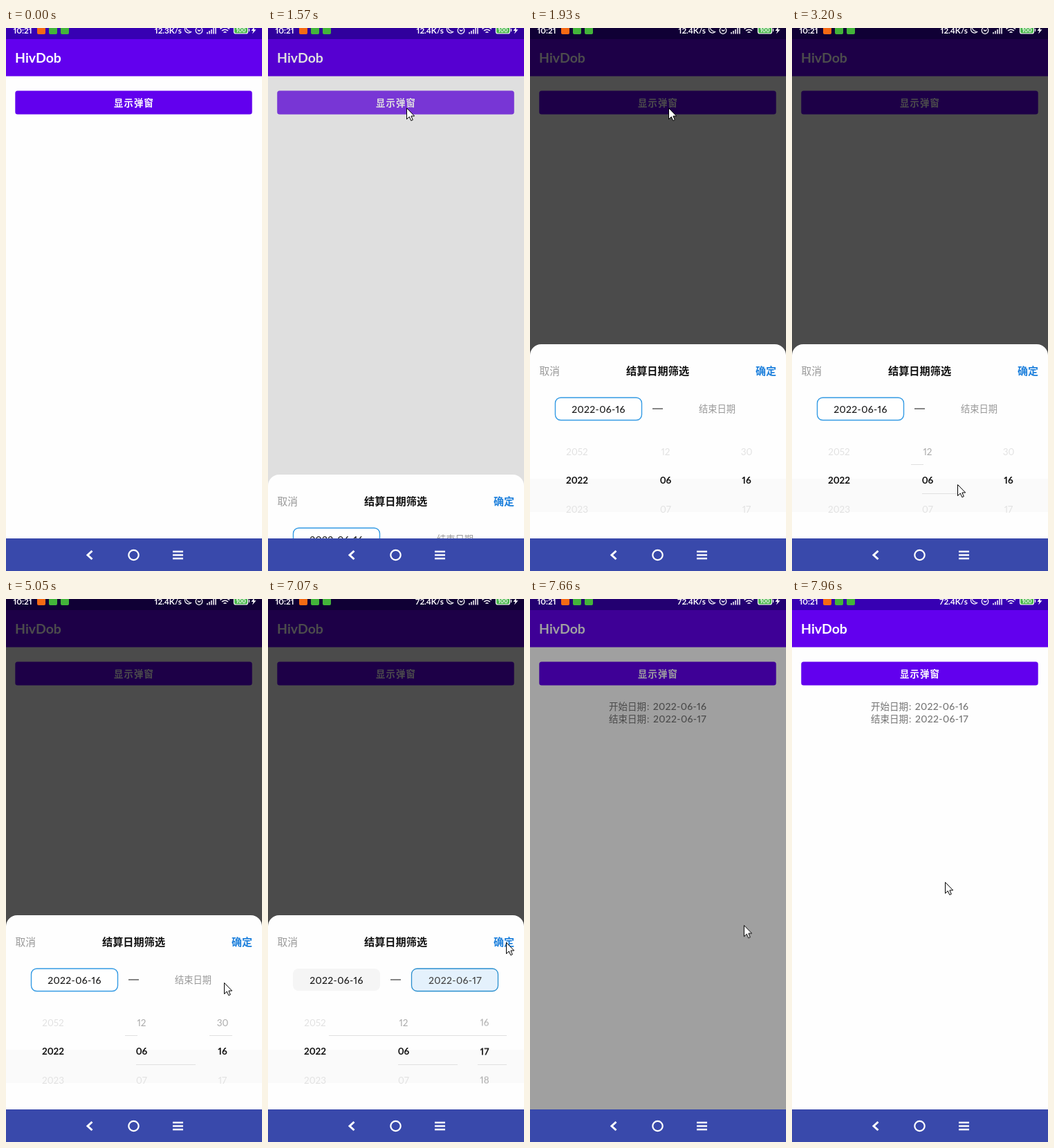
An HTML page for the animation above (8000 ms loop, 370 by 783 pixels).

```html
<!DOCTYPE html>
<html lang="zh-CN">
<head>
<meta charset="utf-8">
<title>Date picker</title>
<style>
html, body { margin: 0; width: 100%; height: 100%; overflow: hidden; background: #fefefe; }
svg { display: block; width: 370px; height: 783px; font-family: Lato, "Noto Sans CJK SC", "Noto Sans CJK", sans-serif; font-variant-numeric: proportional-nums; }
.mid { text-anchor: middle; }
.end { text-anchor: end; }
.bold { font-weight: 700; }
.date { font-size: 14px; font-weight: 500; letter-spacing: .35px; text-anchor: middle; }
.wheel { font-size: 13.5px; text-anchor: middle; fill: #aaa; }
.faint { fill: #e2e2e2; }
.picked { fill: #111; font-weight: 700; }
.rule { stroke: #e0e0e0; }
.result { font-size: 13.5px; fill: #757575; }
.status { font-size: 11.7px; font-weight: 700; fill: #fff; }

#dim, #ripple, #sheet, .spin, #cursor { animation: 8s linear infinite; }
#dim { animation-name: dim; }
#ripple { animation-name: ripple; }
#sheet { animation-name: sheet; }
.spin { animation-name: spin; }
#cursor { animation-name: cursor; }

@keyframes dim {
  0%, 18.7% { opacity: 0; }
  24.125%, 93.375% { opacity: .7; }
  98.5%, 100% { opacity: 0; }
}
@keyframes ripple {
  0%, 19.5% { opacity: 0; }
  19.625%, 21.875% { opacity: .24; }
  24.125%, 100% { opacity: 0; }
}
@keyframes sheet {
  0% { transform: translateY(282px); }
  18.875% { transform: translateY(282px); animation-timing-function: steps(3); }
  21.125% { transform: none; }
  92.625% { transform: none; animation-timing-function: steps(2); }
  94.125%, 100% { transform: translateY(282px); }
}
@keyframes spin {
  0% { transform: none; }
  73.625% { transform: none; animation-timing-function: steps(9); }
  80.375%, 100% { transform: translateY(-41.5px); }
}
@keyframes cursor {
  0% { transform: translate(343px, 273px); }
  6.875% { transform: translate(343px, 273px); animation-timing-function: steps(8); }
  12.875% { transform: translate(200px, 115px); }
  30.25% { transform: translate(200px, 115px); animation-timing-function: steps(4); }
  33.25% { transform: translate(192px, 280px); animation-timing-function: steps(4); }
  36.25% { transform: translate(174px, 608px); animation-timing-function: steps(2); }
  37.75% { transform: translate(183px, 655px); animation-timing-function: steps(3); }
  40% { transform: translate(239px, 658px); animation-timing-function: steps(1); }
  40.75% { transform: translate(247px, 658px); animation-timing-function: steps(4); }
  43.75% { transform: translate(264px, 654px); animation-timing-function: steps(5); }
  47.5% { transform: translate(296px, 630px); animation-timing-function: steps(5); }
  51.25% { transform: translate(307px, 600px); animation-timing-function: steps(3); }
  53.5% { transform: translate(308px, 606px); }
  55% { transform: translate(308px, 606px); animation-timing-function: steps(5); }
  58.75% { transform: translate(314px, 632px); animation-timing-function: steps(5); }
  62.5% { transform: translate(315px, 553px); }
  65.375% { transform: translate(315px, 553px); animation-timing-function: steps(5); }
  69.125% { transform: translate(333px, 667px); }
  70.625% { transform: translate(333px, 667px); animation-timing-function: steps(4); }
  73.625% { transform: translate(332px, 687px); animation-timing-function: steps(6); }
  78.125% { transform: translate(332px, 645px); }
  81.125% { transform: translate(332px, 645px); animation-timing-function: steps(9); }
  87.875% { transform: translate(344px, 495px); }
  94.25% { transform: translate(344px, 495px); animation-timing-function: steps(7); }
  99.5%, 100% { transform: translate(221px, 408px); }
}
</style>
</head>
<body>
<svg viewBox="0 0 370 783">
  <defs>
    <clipPath id="sides"><path d="M0 597H370V630H0ZM0 671H370V699H0Z"/></clipPath>
    <clipPath id="middle"><path d="M0 630H370V671H0Z"/></clipPath>
  </defs>

  <!-- page -->
  <rect width="370" height="783" fill="#fefefe"/>
  <rect width="370" height="69.5" fill="#6200ee"/>
  <rect width="370" height="16" fill="#3700b3"/>
  <text class="bold" x="13" y="50" font-size="19.5" fill="#fff">HivDob</text>
  <rect x="13.3" y="90.4" width="342.4" height="34.2" rx="3.5" fill="#6200ee"/>
  <rect id="ripple" x="13.3" y="90.4" width="342.4" height="34.2" rx="3.5" fill="#fff"/>
  <text class="mid bold" x="185" y="112.5" font-size="13.3" letter-spacing="1.2" fill="#fff">显示弹窗</text>
  <g class="result" data-at="7470 8000">
    <text x="114" y="160">开始日期</text><text x="169" y="160">:</text>
    <text x="114" y="178">结束日期</text><text x="169" y="178">:</text>
    <text class="date" x="216.5" y="160">2022-06-16</text>
    <text class="date" x="216.5" y="178">2022-06-17</text>
  </g>
  <rect id="dim" width="370" height="736"/>

  <!-- status bar -->
  <g class="status">
    <text x="10.5" y="7.5">10:21</text>
    <rect x="45" y="-3" width="12" height="12" rx="2" fill="#f56a14"/>
    <rect x="62" y="-3" width="12" height="12" rx="2" fill="#43b53a"/>
    <rect x="79" y="-3" width="12" height="12" rx="2" fill="#43b53a"/>
    <text class="end" x="254" y="7.5" data-at="0 1270">12.3K/s</text>
    <text class="end" x="254" y="7.5" data-at="1270 5170">12.4K/s</text>
    <text class="end" x="254" y="7.5" data-at="5170 8000">72.4K/s</text>
    <g fill="none" stroke="#fff" stroke-width="1.2">
      <path d="M260-2A5.3 5.3 0 1 0 267.5 5.5A8 8 0 0 1 260-2Z"/>
      <circle cx="279" cy="3.5" r="4.8"/>
      <path d="M277 2.5L279 4.5L281.5 2.5"/>
      <path d="M291 6V8.5M294 4V8.5M297 2V8.5M300 0V8.5M303-2V8.5" stroke-width="1.5"/>
      <path d="M309.5 1.5Q316-4 323 1.5M312 4Q316.5 .5 321 4M314.5 6.5Q316.5 5 318.5 6.5" stroke-width="1.5"/>
      <rect x="329.5" y="-2" width="20" height="10" rx="2.5" fill="#4cb84f"/>
      <path d="M351.5 1V5"/>
    </g>
    <text class="mid" x="339.5" y="6" style="font-size:8px">100</text>
    <path d="M359-2L354.5 4H357.5L356 8.5L361.5 2.2H358.5Z"/>
  </g>

  <!-- bottom sheet -->
  <g id="sheet">
    <path d="M0 736V472A16 16 0 0 1 16 456H354A16 16 0 0 1 370 472V736Z" fill="#fefefe"/>
    <rect y="650" width="370" height="48" fill="#fafafa"/>
    <text x="13.5" y="500" font-size="14.8" fill="#999">取消</text>
    <text class="mid bold" x="184.5" y="500" font-size="15.2" fill="#111">结算日期筛选</text>
    <text class="end bold" x="356" y="500" font-size="15" fill="#1e80dc">确定</text>

    <rect x="36.5" y="533" width="125" height="32.5" rx="8" fill="#fff" stroke="#359be4" stroke-width="1.4" data-at="0 5290"/>
    <rect x="36" y="533" width="126" height="32" rx="8" fill="#f5f5f5" data-at="5290 8000"/>
    <text class="date" x="99" y="554.5" fill="#1b1b1b">2022-06-16</text>
    <path d="M177 549H192" stroke="#444" stroke-width="1.3"/>
    <text class="mid" x="270.5" y="554" font-size="13.3" fill="#999" data-at="0 5290">结束日期</text>
    <g data-at="5290 8000">
      <rect x="207.5" y="533" width="125" height="32.5" rx="8" fill="#e4f1fc" stroke="#2a8fcf" stroke-width="1.3"/>
      <text class="date" x="270.5" y="554.5" fill="#444" data-at="0 6550">2022-06-16</text>
      <text class="date" x="270.5" y="554.5" fill="#444" data-at="6550 8000">2022-06-17</text>
    </g>

    <g class="rule">
      <path d="M172 629.5H190" data-at="2900 8000"/>
      <path d="M188 671.5H240" data-at="3140 8000"/>
      <path d="M240 671.5H274" data-at="3500 8000"/>
      <path d="M294 629.5H327" data-at="3900 8000"/>
      <path d="M88 629.5H345M303 671.5H345" data-at="6430 8000"/>
    </g>

    <g class="wheel" clip-path="url(#sides)">
      <g class="faint">
        <text x="68" y="615.5">2052</text>
        <text x="68" y="698.5">2023</text>
        <text x="196" y="615.5" data-at="0 2900">12</text>
        <text x="196" y="698.5">07</text>
      </g>
      <text x="196" y="615.5" data-at="2900 8000">12</text>
      <g class="spin">
        <text class="faint" x="313" y="615.5" data-at="0 3900">30</text>
        <text x="313" y="615.5" data-at="3900 8000">30</text>
        <text x="313" y="657">16</text>
        <text class="faint" x="313" y="698.5" data-at="0 5710">17</text>
        <text x="313" y="698.5" data-at="5710 8000">17</text>
        <text x="313" y="740">18</text>
      </g>
    </g>
    <g class="wheel picked" clip-path="url(#middle)">
      <text x="68" y="657">2022</text>
      <text x="196" y="657">06</text>
      <g class="spin">
        <text x="313" y="615.5">30</text>
        <text x="313" y="657">16</text>
        <text x="313" y="698.5">17</text>
        <text x="313" y="740">18</text>
      </g>
    </g>
  </g>

  <!-- navigation bar -->
  <rect y="736" width="370" height="47" fill="#3949ab"/>
  <g fill="none" stroke="#fff" stroke-width="2.6">
    <path d="M124.5 754L118 760L124.5 766" stroke-width="3"/>
    <circle cx="184.5" cy="760" r="7.2" stroke-width="2.2"/>
    <path d="M241 755H256M241 760H256M241 765H256"/>
  </g>

  <g id="cursor">
    <path data-at="550 8000" d="M.5 .5V16.5L4.3 13L6.8 18.6L9.3 17.5L6.9 12H11.7Z" fill="#fff" stroke="#000"/>
  </g>
</svg>
<script>
// Show each marked element only between its two times (ms).
const loop = 8000;
for (const el of document.querySelectorAll('[data-at]')) {
  const [from, to] = el.dataset.at.split(' ').map(Number);
  const key = (opacity, ms) => ({ opacity, offset: ms / loop, easing: 'steps(1, end)' });
  const keys = [key(from ? 0 : 1, 0)];
  if (from) keys.push(key(1, from));
  if (to < loop) keys.push(key(0, to));
  keys.push(key(to < loop ? 0 : 1, loop));
  el.animate(keys, { duration: loop, iterations: Infinity });
}
</script>
</body>
</html>
```
